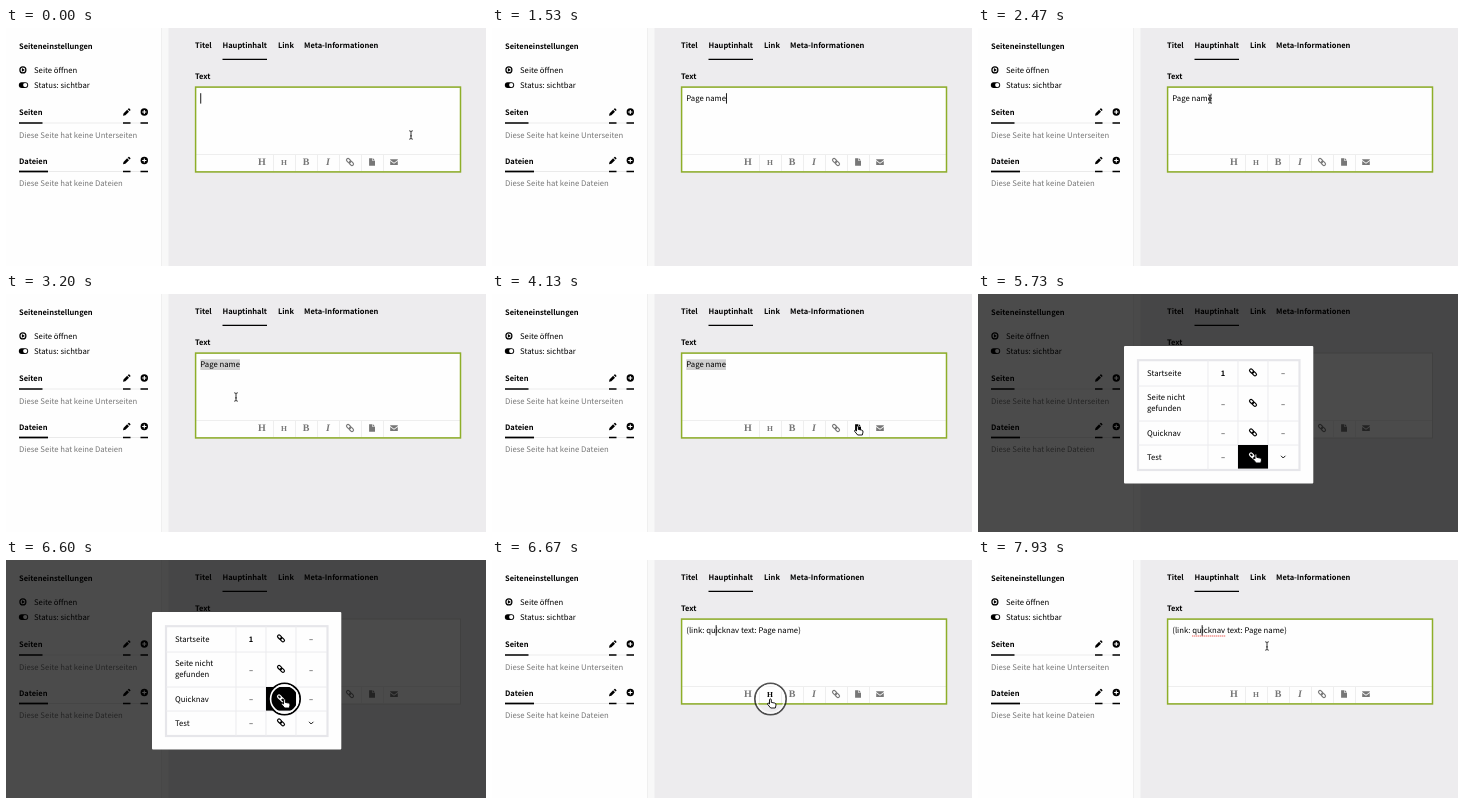
Recreate the animation shown at these times as an HTML page. Size 480x238 px, loop 8000 ms.

```html
<!DOCTYPE html>
<html lang="de">
<head>
<meta charset="utf-8">
<title>Link einfügen</title>
<style>
  html, body { margin: 0; width: 100%; height: 100%; overflow: hidden; background: #edecee; }
  svg { display: block; width: 100%; height: 100%; }
  text {
    font: 7.74px "Noto Sans CJK SC", "Noto Sans CJK JP", "Noto Sans CJK", "Noto Sans", sans-serif;
    text-rendering: geometricPrecision;
    white-space: pre;
  }
  .bold { font-weight: 600; font-size: 7.5px; }
  .muted { fill: #777; }
  .mid { text-anchor: middle; }
  .tool { color: #777; fill: currentColor; }
  .tool.hover { color: #000; }
  .tool text { font-family: "Liberation Serif", serif; font-weight: bold; text-anchor: middle; }
  .grid { stroke: #ebebee; fill: none; }
</style>
</head>
<body>
<svg viewBox="0 0 480 238">
  <defs>
    <g id="chain" fill="none" stroke="currentColor" stroke-width="1.15" transform="rotate(45)">
      <rect x="-4.3" y="-1.5" width="4.8" height="3" rx="1.5"/>
      <rect x="-.5" y="-1.5" width="4.8" height="3" rx="1.5"/>
    </g>
    <g id="section">
      <path d="M13 95H142" stroke="#e2e2e2" stroke-width=".7"/>
      <path d="M117 95h7.5M134.5 95h7.5" stroke="#000" stroke-width="1.3"/>
      <path d="M117 87.8l.5-2.4 3.6-3.6 1.9 1.9-3.6 3.6zM121.7 81.2l.8-.7q.5-.3.9.1l.9.9q.4.5 0 .9l-.7.7z"/>
      <circle cx="138.3" cy="84" r="3.7"/>
      <path d="M136.2 84h4.2m-2.1-2.1v4.2" stroke="#fff" stroke-width="1.1"/>
    </g>
    <path id="ibeam" d="M-1.8-4.2Q0-4.2 0-3.2 0-4.2 1.8-4.2M0-3.4V3.4M-1.8 4.2Q0 4.2 0 3.2 0 4.2 1.8 4.2M-.9.9H.9" fill="none" stroke="#222" stroke-width=".9"/>
    <path id="hand" d="M-1 .8a.9.9 0 0 1 1.8 0V3.4l3.5.7q1.4.4 1.2 2L4.8 9H.2L-2.9 5.3q-.3-1.3 1-1.1l.9.8z" fill="#fff" stroke="#000" stroke-width=".9"/>
    <path id="arrow" d="M0 0V7.4L1.7 5.8 2.9 8.5 4.2 7.9 3 5.3H5.3Z" fill="#000" stroke="#fff" stroke-width=".7"/>
  </defs>

  <rect width="480" height="238" fill="#edecee"/>
  <rect width="162.5" height="238" fill="#f8f8f8"/>
  <rect width="155" height="238" fill="#fefefe"/>
  <path d="M155.5 0V238" stroke="#efefef"/>

  <text class="bold" x="13" y="21.4">Seiteneinstellungen</text>
  <circle cx="16.9" cy="41.9" r="3" fill="none" stroke="#000" stroke-width="1.2"/>
  <path d="M15.9 40.1l3 1.8-3 1.8z"/>
  <text x="28" y="45">Seite öffnen</text>
  <rect x="12.8" y="54.2" width="9.4" height="5.8" rx="2.9"/>
  <circle cx="19.2" cy="57.1" r="2.1" fill="#fff"/>
  <text x="28" y="60.2">Status: sichtbar</text>

  <use href="#section"/>
  <text class="bold" x="13" y="87">Seiten</text>
  <path d="M13 95H36.5M13 143.5H42" stroke="#000" stroke-width="1.3"/>
  <text class="muted" x="13" y="109.6">Diese Seite hat keine Unterseiten</text>
  <use href="#section" y="48.5"/>
  <text class="bold" x="13" y="135.5">Dateien</text>
  <path d="M13 143.5H42" stroke="#000" stroke-width="1.3"/>
  <text class="muted" x="13" y="158.3">Diese Seite hat keine Dateien</text>

  <text class="bold" x="189" y="20.4">Titel</text>
  <text class="bold" x="216.5" y="20.4">Hauptinhalt</text>
  <text class="bold" x="272" y="20.4">Link</text>
  <text class="bold" x="298" y="20.4">Meta-Informationen</text>
  <path d="M216.5 31.3H261" stroke="#000" stroke-width="1.3"/>
  <text class="bold" x="189" y="50.6">Text</text>

  <rect x="189.5" y="59" width="265" height="85" fill="#fefefe" stroke="#d8d8d8"/>
  <path d="M190 126.5H454M267.5 126.5v17m22-17v17m22-17v17m22-17v17m22-17v17m22-17v17" stroke="#ededed" stroke-width=".9"/>
  <rect id="focus" x="189.6" y="59.1" width="264.9" height="84.8" fill="none" stroke="#8eae29" stroke-width="1.5"/>
  <g class="tool" transform="translate(256 134)"><text y="3.4" style="font-size:10px">H</text></g>
  <g class="tool" transform="translate(278 134)"><text y="2.9" style="font-size:7.6px">H</text></g>
  <g class="tool" transform="translate(300 134)"><text y="3.4" style="font-size:10px">B</text></g>
  <g class="tool" transform="translate(322 134)"><text y="3.4" style="font-size:10px;font-style:italic">I</text></g>
  <g class="tool" transform="translate(344 134)"><use href="#chain"/></g>
  <g class="tool" transform="translate(366 134)"><path d="M-2.9-3.7H.4V-1H3V3.7H-2.9zM1-3.7L3-1.6H1z"/></g>
  <g class="tool" transform="translate(388 134)"><path d="M-3.8-2.8H3.8V-1.9L0 .8-3.8-1.9zM-3.8-1L0 1.7 3.8-1V3H-3.8z"/></g>

  <rect id="selection" y="65.3" height="10.7" fill="#d0d0d0"/>
  <text id="line" x="194.3" y="73.4"></text>
  <path id="spelling" stroke="#e8362c" stroke-width="1.1" stroke-dasharray="1.1 .9"/>
  <rect id="caret" y="65.2" width=".9" height="10.4"/>

  <g id="modal">
    <rect width="480" height="238" opacity=".7"/>
    <rect x="146" y="52" width="189.3" height="137.5" rx="1" fill="#fefefe"/>
    <rect class="grid" x="160" y="66.2" width="161.5" height="109.8" stroke-width="2.2" style="stroke:#e6e6ea"/>
    <path class="grid" d="M160 92H321M160 127H321M160 151H321M230 66V176M260 66V176M290 66V176"/>
    <text x="169" y="82.2">Startseite</text>
    <text x="169" y="106.3">Seite nicht</text>
    <text x="169" y="117.2">gefunden</text>
    <text x="169" y="141.6">Quicknav</text>
    <text x="169" y="165.6">Test</text>
    <text class="bold mid" x="245" y="82.2">1</text>
    <g id="cells"></g>
    <path d="M303 161.8l2.2 2.2 2.2-2.2" fill="none" stroke="#000" stroke-width=".9"/>
  </g>

  <g id="ring" fill="none">
    <circle r="15.6" stroke="#000" stroke-width="1.8"/>
    <circle r="13.9" stroke="#fff" stroke-width="1.6"/>
  </g>
  <use id="pointer"/>
</svg>
<script>
const $ = id => document.getElementById(id);
const show = (id, on) => $(id).setAttribute('visibility', on ? 'visible' : 'hidden');
const set = (id, attrs) => { for (const k in attrs) $(id).setAttribute(k, attrs[k]); };
const clamp = (v, lo, hi) => Math.max(lo, Math.min(hi, v));

const LOOP = 8000, FPS = 15, TEXT_X = 194.3;
const TYPED = 'Page name', LINKED = '(link: quicknav text: Page name)';
const TYPE_START = 330, TYPE_STEP = 110, DRAG = 2390;
const OPEN = 4725, CLOSE = 6660;
const ROWS = [[66, 92], [92, 127], [127, 151], [151, 175]];

// Pointer hot spot: time, x, y
const PATH = [
  [0, 405, 107], [1800, 405, 107], [2100, 310, 88], [2330, 235, 71], [2400, 235, 71],
  [2800, 194, 71], [2930, 194, 71], [3200, 230, 103], [3467, 358, 125],
  [3733, 365.5, 132], [5067, 365.5, 132], [5533, 300, 170], [5733, 278, 160],
  [6133, 278.5, 139], [7400, 278.5, 139], [7933, 289, 86], [8000, 289, 86]
];

$('cells').innerHTML = ROWS.map(([top, bottom], i) => {
  const mid = (top + bottom) / 2;
  const dash = x => `<text class="mid" x="${x}" y="${mid + 3}">–</text>`;
  return `<g class="cell"><rect x="260" y="${top}" width="30" height="${bottom - top - .4}"/>
    <use href="#chain" x="0" y="0" transform="translate(275 ${mid - .6})"/></g>` +
    (i ? dash(245) : '') + (i < 3 ? dash(305) : '');
}).join('');
const cells = [...document.querySelectorAll('.cell')];
const tools = [...document.querySelectorAll('.tool')];

// Smooth curve through the path points, at rest wherever two neighbours coincide
function pointerAt(t) {
  const i = clamp(PATH.findIndex(p => p[0] > t) - 1, 0, PATH.length - 2);
  const a = PATH[i], b = PATH[i + 1], span = b[0] - a[0], u = (t - a[0]) / span;
  const slope = (k, axis) => {
    const p = PATH[k - 1], q = PATH[k], r = PATH[k + 1];
    const rests = (m, n) => m[1] === n[1] && m[2] === n[2];
    return !p || !r || rests(p, q) || rests(q, r) ? 0 : (r[axis] - p[axis]) / (r[0] - p[0]);
  };
  return [1, 2].map(axis =>
    (1 + 2 * u) * (1 - u) ** 2 * a[axis] + u * u * (3 - 2 * u) * b[axis] +
    span * (u * (1 - u) ** 2 * slope(i, axis) - u * u * (1 - u) * slope(i + 1, axis)));
}

const advance = n => n ? $('line').getSubStringLength(0, n) : 0;

function render(t) {
  const [x, y] = pointerAt(t);
  const open = t >= OPEN && t < CLOSE, linked = t >= CLOSE;
  const selected = t >= DRAG && !linked;
  const typed = clamp(Math.floor((t - TYPE_START) / TYPE_STEP) + 1, 0, TYPED.length);

  $('line').textContent = linked ? LINKED : TYPED.slice(0, typed);
  const end = TEXT_X + advance(typed);

  const left = t < 2930 ? clamp(x, TEXT_X, end) : TEXT_X;
  set('selection', { x: left, width: end - left });
  show('selection', selected);

  const blinkOn = linked ? (t - 6600) % 1000 < 500 : t < 1750 || t > 2250;
  set('caret', { x: end });
  show('caret', !selected && blinkOn);

  show('spelling', t >= 6995);
  if (linked) set('spelling', { d: `M${TEXT_X + advance(7)} 76H${TEXT_X + advance(15)}` });

  set('focus', { opacity: open ? clamp(1 - (t - 4734) / 200, 0, 1) : 1 });
  show('modal', open);

  const overTools = !open && t > 3500 && y > 126;
  tools.forEach((tool, i) =>
    tool.classList.toggle('hover', (overTools || (open && t < 5100)) && Math.abs(x - 256 - 22 * i) < 11));

  const overCells = open && x > 260 && x < 290;
  cells.forEach((cell, i) => {
    const hover = overCells && y >= ROWS[i][0] && y < ROWS[i][1];
    cell.firstChild.setAttribute('fill', hover ? '#000' : 'none');
    cell.style.color = hover ? '#fff' : '#000';
  });

  const shape = overCells || overTools ? 'hand' : open ? 'arrow' : 'ibeam';
  set('pointer', { href: '#' + shape, transform: `translate(${x} ${y})` });
  show('pointer', t < TYPE_START || t > 1660);

  set('ring', { transform: `translate(${x} ${y})`, opacity: clamp(1 - (t - 6601) / 200, 0, 1) });
  show('ring', t >= 6595 && t < 6795);
}

function tick(now) {
  const step = Math.floor(((now % LOOP) + 4) * FPS / 1000);
  render(step * 1000 / FPS % LOOP);
  requestAnimationFrame(tick);
}
render(0);
requestAnimationFrame(tick);
</script>
</body>
</html>
```
